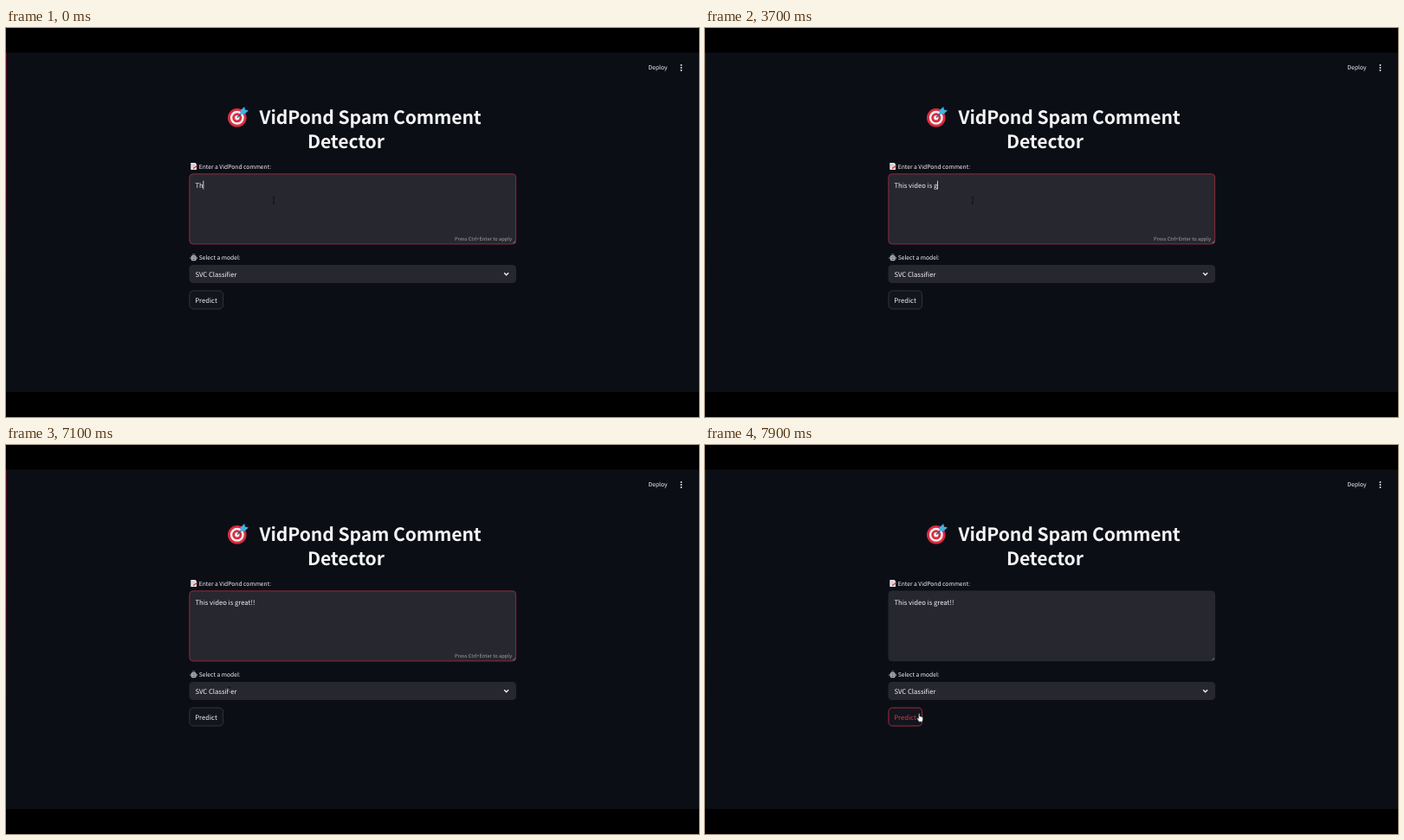
Recreate the animation shown at these times as an HTML page. Size 800 px wide and 450 px high, loop 8 s.

```html
<!DOCTYPE html>
<html lang="en">
<head>
<meta charset="utf-8">
<title>Spam comment detector</title>
<style>
  html, body { margin: 0; width: 100%; height: 100%; overflow: hidden; background: #000; }
  svg { display: block; width: 800px; height: 450px; }
  text {
    font: 7.68px "Noto Sans CJK JP", "Noto Sans CJK SC", "Noto Sans CJK", "Open Sans", sans-serif;
    fill: #f4f4f5; text-rendering: geometricPrecision; white-space: pre;
  }
  .title { font-size: 21.1px; font-weight: 700; letter-spacing: -.1px; }
  .small { font-size: 6.72px; }
  .hint { font-size: 5.76px; fill: #a3a4a8; }
  .field { fill: #26272f; }
</style>
</head>
<body>
<svg viewBox="0 0 800 450">
  <defs>
    <linearGradient id="edge" x2="0" y2="1">
      <stop offset="0" stop-color="#4a0a1c"/>
      <stop offset=".6" stop-color="#35091a"/>
      <stop offset="1" stop-color="#0c0e16"/>
    </linearGradient>
  </defs>
  <rect y="28.5" width="800" height="392.5" fill="#0c0e16"/>
  <rect y="28.5" width="1" height="286" fill="url(#edge)"/>

  <!-- toolbar -->
  <text class="small" x="741.6" y="48.2">Deploy</text>
  <g fill="#f4f4f5">
    <circle cx="779.5" cy="43" r=".95"/><circle cx="779.5" cy="46" r=".95"/><circle cx="779.5" cy="49" r=".95"/>
  </g>
  <g id="running">
    <g fill="none" stroke="#484a51" stroke-width=".9">
      <circle cx="652.3" cy="48.6" r="2.7"/><circle cx="660" cy="48.6" r="2.7"/>
      <path d="M656 49.5V46.6L653.8 44.6L656.8 42.6L658.6 44.6H661"/>
      <circle cx="658.6" cy="41" r=".7"/>
    </g>
    <text class="small" x="667" y="48.2" style="fill:#4b4d54">RUNNING...</text>
    <text class="small" x="713.5" y="48.2" style="fill:#74757b">Stop</text>
  </g>

  <!-- heading -->
  <circle cx="266.8" cy="103.8" r="10.8" fill="#dc2b3e"/>
  <circle cx="266.8" cy="103.8" r="8" fill="#f3eff0"/>
  <circle cx="266.8" cy="103.8" r="5.5" fill="#dc2b3e"/>
  <circle cx="266.8" cy="103.8" r="2.7" fill="#f3eff0"/>
  <path d="M267 103.5L274 96.5" stroke="#245b7c" stroke-width="1.3"/>
  <path d="M270.4 99.8L270.8 95.2L275.2 91L276 94.4L280 95.4L275.5 99.6Z" fill="#3fb2e6"/>
  <text class="title" x="548.6" y="111" text-anchor="end">VidPond Spam Comment</text>
  <text class="title" x="348" y="139.4">Detector</text>

  <!-- comment field -->
  <path d="M213.3 156H218.6L220 157.5V164H213.3Z" fill="#e6e6e8"/>
  <path d="M214.5 158.2H218M214.5 160H217" stroke="#9b9ca2" stroke-width=".5"/>
  <path d="M216 162.6L220.6 159.4" stroke="#d8414c" stroke-width="1.5"/>
  <text class="small" x="222.7" y="162.6">Enter a VidPond comment:</text>
  <rect class="field" x="211.5" y="168.5" width="377.5" height="81.7" rx="4.3"/>
  <rect id="focus" x="211.9" y="168.9" width="376.7" height="81" rx="4" fill="none" stroke="#a62c3a" stroke-width=".8"/>
  <path d="M585.2 249L588 246.2M586.8 249L588 247.8" stroke="#b5b5b9" stroke-width=".5"/>
  <text id="hint" class="hint" x="584" y="245.8" text-anchor="end">Press Ctrl+Enter to apply</text>
  <text id="typed" x="218.4" y="184.6"></text>
  <rect id="caret" y="176.7" width=".8" height="9.8" fill="#f4f4f5"/>

  <!-- model field -->
  <rect x="213.8" y="263" width="5.8" height="6.3" rx="1.6" fill="#b9bbc0"/>
  <path d="M213 265V267.3M220.4 265V267.3M215.2 261.9H218.2" stroke="#8f9399" stroke-width="1"/>
  <path d="M215 265H218.5M215.2 267.5H218.3" stroke="#3d4048" stroke-width=".9"/>
  <text class="small" x="222.7" y="267.9">Select a model:</text>
  <rect class="field" x="211.5" y="274" width="377.5" height="21" rx="4.3"/>
  <text x="218.4" y="287.5">SVC Classifier</text>
  <path d="M575.1 283.3L577.6 285.8L580.1 283.3" fill="none" stroke="#f4f4f5" stroke-width="1.3"/>

  <!-- button -->
  <rect id="button" x="211.9" y="304" width="38.7" height="21" rx="4.3" stroke-width=".8"/>
  <text id="label" x="218.2" y="317.5">Predict</text>

  <!-- pointers -->
  <path id="beam" d="M-1.2 -3.6H1.2M0 -3.6V3.6M-1.2 3.6H1.2" stroke="#0d0e13" stroke-width=".8" fill="none"/>
  <path id="hand" d="M-1.6 -4.2Q-.8 -5 -.1 -4.2V-1.2Q.8 -1.8 1.3 -.9Q2.1 -1.4 2.5 -.5Q3.5 -.8 3.6 .4V2.6L2.8 5H-1L-3.4 1.4Q-3.4 .3 -2.4 .7L-1.6 1.4Z"
        fill="#fff" stroke="#14151b" stroke-width=".6"/>
</svg>
<script>
const $ = id => document.getElementById(id);
const LOOP = 8000, COMMENT = "This video is great!!";

// [time, letters typed so far]
const keys = [[0, 2], [1500, 3], [1600, 4], [1900, 5], [2000, 6], [2200, 7], [2400, 8], [2500, 9],
  [2700, 10], [3000, 12], [3100, 14], [3700, 15], [3800, 16], [4000, 17], [4200, 18], [4800, 19], [6400, 21]];
const caretOff = [[300, 800], [5300, 5800], [6400, LOOP]];
// [time, x, y]
const path = [[6800, 309, 199.5], [7100, 258, 284], [7300, 248, 315.2], [LOOP, 248, 315.2]];

const show = (id, on) => $(id).setAttribute("visibility", on ? "visible" : "hidden");

function pointer(t) {
  if (t <= path[0][0]) return path[0].slice(1);
  const i = path.findIndex(p => p[0] > t);
  const [t0, x0, y0] = path[i - 1], [t1, x1, y1] = path[i];
  const k = (t - t0) / (t1 - t0);
  return [x0 + (x1 - x0) * k, y0 + (y1 - y0) * k];
}

function draw(time) {
  const t = Math.floor(time % LOOP / 100) * 100;
  const typed = $("typed");
  typed.textContent = COMMENT.slice(0, keys.findLast(k => k[0] <= t)[1]);
  $("caret").setAttribute("x", 218.2 + typed.getComputedTextLength());
  show("caret", !caretOff.some(([a, b]) => t >= a && t < b));

  const [x, y] = pointer(t), hover = t >= 7300, pressed = t >= 7500 && t < 7800;
  for (const id of ["beam", "hand"]) {
    $(id).setAttribute("transform", `translate(${x} ${y})`);
    show(id, (id === "hand") === hover);
  }
  show("focus", t < 7400);
  show("hint", t < 7400);
  show("running", pressed);
  $("button").setAttribute("fill", pressed ? "#ee3b4b" : "#12151e");
  $("button").setAttribute("stroke", pressed ? "#ee3b4b" : hover ? "#c63542" : "#3c3e46");
  $("label").style.fill = hover && !pressed ? "#dc3644" : "#f4f4f5";
}

const start = performance.now();
function tick() {
  draw(performance.now() - start);
  requestAnimationFrame(tick);
}
tick();
</script>
</body>
</html>
```
